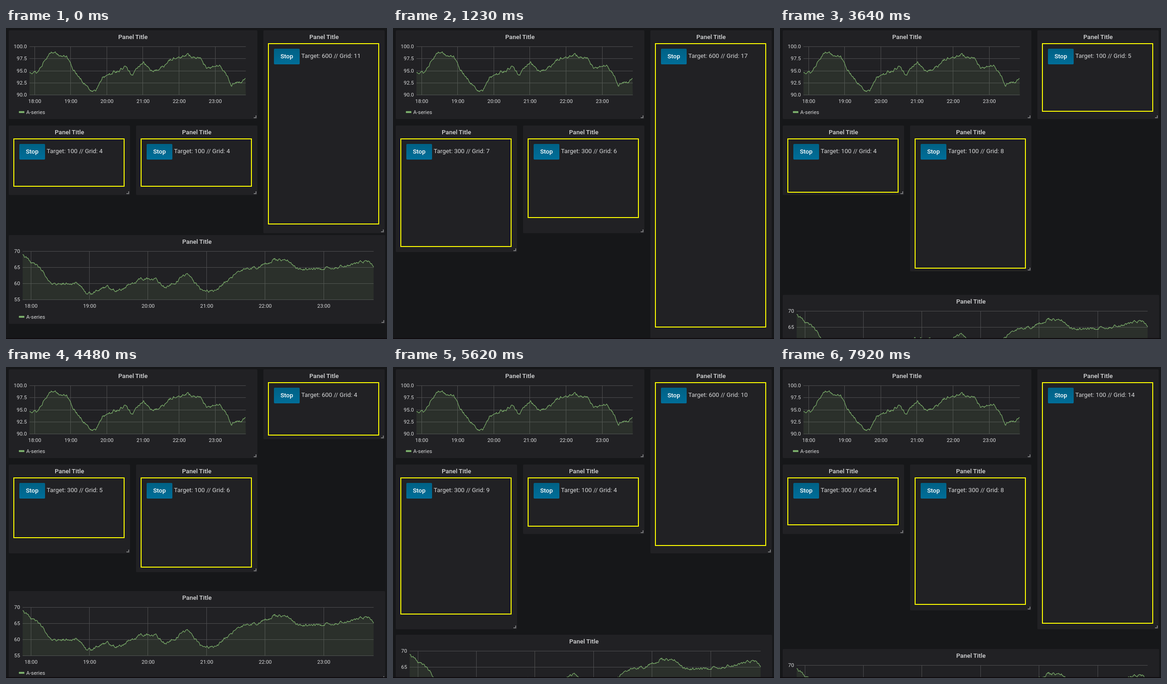
Animation, 829 px wide and 676 px high, one loop 8000 ms. Source, as an HTML page:

```html
<!DOCTYPE html>
<html lang="en">
<head>
<meta charset="utf-8">
<title>Auto-height dashboard</title>
<style>
  html, body { margin: 0; width: 100%; height: 100%; overflow: hidden; background: #161719; }
  #stage {
    position: relative; width: 829px; height: 676px; overflow: hidden;
    font: 13.4px Roboto, sans-serif; color: #d8d9da;
  }
  #stage::after { content: ""; position: absolute; inset: 674px 0 0; background: #0f0b0e; }
  .panel { position: absolute; background: #212124; border-radius: 2px; }
  .panel::after {
    content: ""; position: absolute; right: 2px; bottom: 2px; width: 4px; height: 4px;
    border: solid #77787a; border-width: 0 2px 2px 0;
  }
  .title { height: 29px; line-height: 29px; text-align: center; font-size: 13.5px; font-weight: 500; }
  .box {
    position: absolute; left: 10px; top: 28px; width: 242px;
    box-sizing: border-box; border: 2px solid #ff0;
  }
  .button {
    position: absolute; left: 11px; top: 10px; width: 56px; height: 34px; line-height: 34px;
    border-radius: 2px; background: linear-gradient(#006185, #006e99);
    color: #fff; font-weight: 500; text-align: center;
  }
  .label { position: absolute; left: 70.5px; top: 16px; line-height: 20px; white-space: pre; }
  svg { position: absolute; left: 0; top: 0; font-size: 11.4px; fill: #d8d9da; }
  .grid { stroke: #4e4e50; }
  .line { fill: none; stroke: #7eb26d; stroke-width: 1.2; stroke-linejoin: round; }
  .area { fill: #7eb26d; fill-opacity: .1; }
</style>
</head>
<body>
<div id="stage"></div>
<script>
const LOOP = 8000;
const TICK = 104.1;        // screen refresh interval
const SCALE = 1.0333;
const ROW = 40 * SCALE;
const stage = document.getElementById('stage');

// Each box alternates between a high and a low target once per period.
const boxes = [
  { x: 6, row: 5, low: 100, high: 300, start: 80, period: 1940, duration: 2000 },
  { x: 283, row: 5, low: 100, high: 300, start: 40, period: 2850, duration: 3000 },
  { x: 560, row: 0, low: 100, high: 600, start: -1607, period: 2875, duration: 3000 }
];

function bezier(x1, y1, x2, y2) {
  const curve = (a, b, s) => 3 * a * s * (1 - s) ** 2 + 3 * b * s * s * (1 - s) + s ** 3;
  return x => {
    if (x <= 0 || x >= 1) return x <= 0 ? 0 : 1;
    let low = 0, high = 1;
    for (let i = 0; i < 24; i++) {
      const mid = (low + high) / 2;
      if (curve(x1, x2, mid) < x) low = mid; else high = mid;
    }
    return curve(y1, y2, low);
  };
}
const easeInOut = bezier(.42, 0, .58, 1);
const ease = bezier(.25, .1, .25, 1);

function boxState({ low, high, start, period, duration }, time) {
  const cycle = Math.floor((time - start) / period);
  const [from, target] = cycle % 2 ? [high, low] : [low, high];
  const progress = easeInOut((time - start - cycle * period) / duration);
  const height = (from + (target - from) * progress) * SCALE;
  return { target, height, rows: Math.ceil((height + 46) / ROW) };
}

const usedRows = time => Math.max(...boxes.map(box => box.row + boxState(box, time).rows));
const rowTop = row => 5.3 + row * ROW;
const panelHeight = rows => rows * ROW - 14;

// The lower panel follows row changes with a 200 ms transition.
const SAMPLES = 40;
const weights = Array.from({ length: SAMPLES }, (_, i) => ease((i + 1) / SAMPLES) - ease(i / SAMPLES));
const lowerRow = time =>
  weights.reduce((sum, weight, i) => sum + weight * usedRows(time - (i + .5) * 200 / SAMPLES), 0);

function addElement(parent, className, text = '') {
  const element = document.createElement('div');
  element.className = className;
  element.textContent = text;
  return parent.appendChild(element);
}

function addPanel(x, row, width, rows) {
  const panel = addElement(stage, 'panel');
  Object.assign(panel.style, {
    left: x + 'px', top: rowTop(row) + 'px', width: width + 'px', height: panelHeight(rows) + 'px'
  });
  addElement(panel, 'title', 'Panel Title');
  return panel;
}

function seededRandom(seed) {
  return () => (seed = (seed * 16807) % 2147483647) / 2147483647;
}

// Draws a noisy series through a few [hour, value] key points.
function addChart(panel, { firstHour, hourWidth, max, step, steps, digits, keys, seed }) {
  const top = 35.5, bottom = 140.8;
  const toX = hour => firstHour + (hour - 18) * hourWidth;
  const toY = value => top + (max - value) / (step * steps) * (bottom - top);
  const left = toX(keys[0][0]), right = toX(keys.at(-1)[0]);
  const random = seededRandom(seed);
  const points = [];
  let noise = 0, next = 1;
  for (let x = left; x <= right; x += 1.25) {
    while (toX(keys[next][0]) < x) next++;
    const [[hourA, valueA], [hourB, valueB]] = [keys[next - 1], keys[next]];
    const mix = (x - toX(hourA)) / (toX(hourB) - toX(hourA));
    noise = noise * .75 + (random() - .5) * 5;
    points.push(`${x.toFixed(1)} ${(toY(valueA + (valueB - valueA) * mix) + noise).toFixed(1)}`);
  }
  const line = 'M' + points.join('L');
  let grid = '', text = '';
  for (let i = 0; i <= steps; i++) {
    const value = max - i * step, y = toY(value);
    grid += `M${left} ${Math.floor(y) + .5}H${right}`;
    text += `<text x="${left - 5.5}" y="${y + 3.5}" text-anchor="end">${value.toFixed(digits)}</text>`;
  }
  for (let hour = 18; hour < 24; hour++) {
    const x = toX(hour);
    grid += `M${Math.floor(x) + .5} ${top}V${bottom}`;
    text += `<text x="${x + .5}" y="157.5" text-anchor="middle">${hour}:00</text>`;
  }
  panel.insertAdjacentHTML('beforeend', `<svg width="100%" height="100%">
    <path class="grid" d="${grid}"/>
    <path class="area" d="${line}L${right} ${bottom}H${left}Z"/>
    <path class="line" d="${line}"/>${text}
    <rect x="22" y="175.7" width="12" height="4" rx="1" fill="#7eb26d"/>
    <text x="38" y="181.5">A-series</text></svg>`);
}

addChart(addPanel(6, 0, 540.5, 5), {
  firstHour: 56, hourWidth: 78.6, max: 100, step: 2.5, steps: 4, digits: 1, seed: 71,
  keys: [
    [17.86, 94.4], [18.06, 94.7], [18.47, 99], [18.88, 98], [19.08, 95.4], [19.49, 91.3], [19.7, 90.8],
    [19.9, 93.8], [20.5, 95.6], [20.71, 94.2], [21.02, 97], [21.22, 95], [21.52, 95.6], [21.8, 97.5],
    [22.24, 98.2], [22.6, 97.4], [22.77, 95.4], [23.15, 96.2], [23.46, 92.1], [23.85, 93.2]]
});

for (const box of boxes) {
  box.panel = addPanel(box.x, box.row, 264, 4);
  box.frame = addElement(box.panel, 'box');
  addElement(box.frame, 'button', 'Stop');
  box.label = addElement(box.frame, 'label');
}

const lowerPanel = addPanel(6, 11, 819, 5);
addChart(lowerPanel, {
  firstHour: 48, hourWidth: 127.4, max: 70, step: 5, steps: 3, digits: 0, seed: 1234,
  keys: [
    [17.86, 68.7], [18.16, 64.7], [18.37, 60], [18.8, 60], [18.97, 56.4], [19.28, 59], [19.5, 57.8],
    [19.85, 61.4], [20.15, 61.4], [20.3, 58.6], [20.67, 63], [20.91, 57.9], [21.18, 58.2], [21.6, 64.3],
    [21.93, 65.4], [22.17, 67.8], [22.4, 66.8], [22.58, 64.5], [23, 64.7], [23.4, 65.6], [23.74, 67.4],
    [23.855, 65.3]]
});

function render(now) {
  const time = Math.floor((now % LOOP + 25) / TICK) * TICK;
  for (const box of boxes) {
    const { target, height, rows } = boxState(box, time);
    box.frame.style.height = height + 'px';
    box.panel.style.height = panelHeight(rows) + 'px';
    box.label.textContent = `Target: ${target} // Grid: ${rows}`;
  }
  lowerPanel.style.top = Math.round(rowTop(lowerRow(time))) + 'px';
  requestAnimationFrame(() => render(performance.now()));
}
render(0);
</script>
</body>
</html>
```
